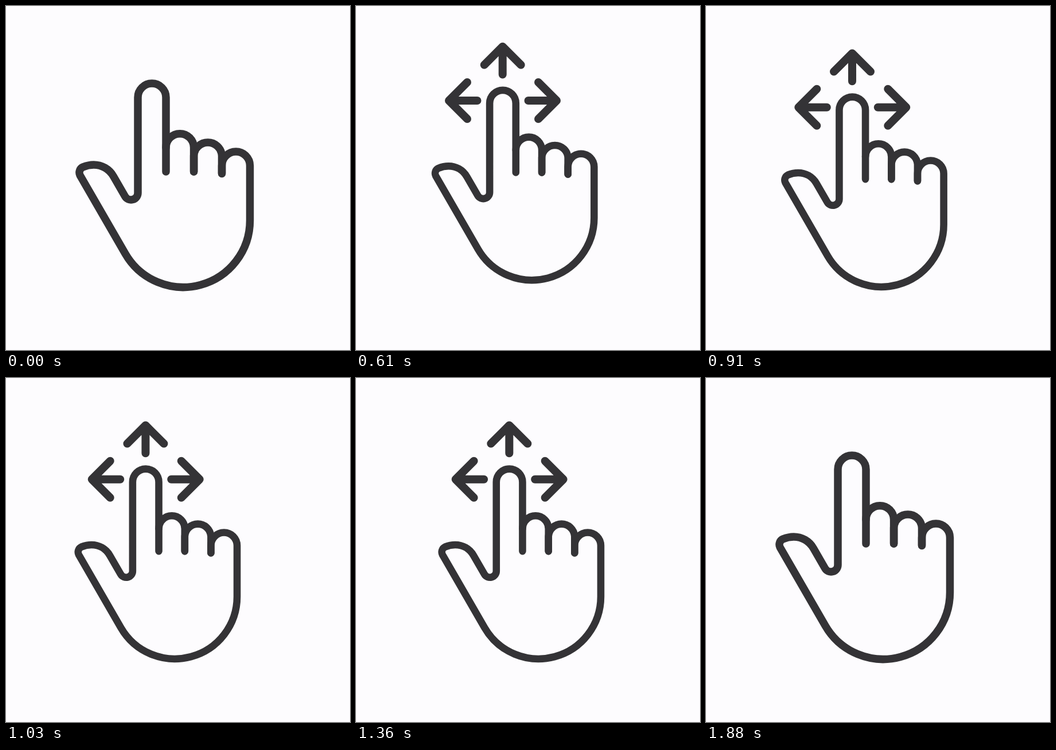
Recreate the animation shown at these times as an HTML page. Size 600 px wide and 600 px high, loop 2 s.

```html
<!DOCTYPE html>
<html lang="en">
<head>
<meta charset="utf-8">
<title>Drag gesture</title>
<style>
  html, body { margin: 0; width: 100%; height: 100%; overflow: hidden; background: #fdfcfe; }
  svg { display: block; width: 100%; height: 100%; }
  path { fill: none; stroke: #343336; stroke-width: 13.5; stroke-linecap: round; stroke-linejoin: round; }
</style>
</head>
<body>
<svg viewBox="0 0 600 600">
  <g id="scene">
    <path d="M279 289V159.5A24.5 24.5 0 0 0 230 159.5V326A12 12 0 0 1 207.6 332
             L187.4 297C180 284 167 277 153 277C147 277 140 278.5 134 281
             C128.5 283.5 126.5 290 129.1 295.4L208.1 432.2
             A116.5 116.5 0 0 0 425.5 374V278.5A24.5 24.5 0 0 0 376.5 278.5V292.5"/>
    <path d="M279 247A24.3 24.3 0 0 1 327.6 247V289"/>
    <path d="M327.6 289V261A24.5 24.5 0 0 1 376.5 261V292"/>
    <g id="arrows"></g>
  </g>
</svg>
<script>
const LOOP = 2000;
const PRESSED = 0.932;
const PIVOT = [276, 482];
const REACH = 15;
const ARM = 32;
const MOVE_START = 468, MOVE_TIME = 207;

// Tip position, pointing angle and shaft length, measured while the hand is pressed.
const arrows = [
  { tip: [255.7, 82.5], angle: 0, shaft: 48.7 },
  { tip: [350, 176.7], angle: 90, shaft: 49.5 },
  { tip: [162, 176.7], angle: -90, shaft: 49.5, slide: 13 },
];

const scene = document.getElementById('scene');
const arrowLayer = document.getElementById('arrows');
for (const arrow of arrows) {
  arrow.path = document.createElementNS('http://www.w3.org/2000/svg', 'path');
  arrow.path.style.strokeWidth = 14;
  arrowLayer.append(arrow.path);
}

const scaleAbout = ([x, y], s) => `translate(${x} ${y}) scale(${s}) translate(${-x} ${-y})`;
arrowLayer.setAttribute('transform', scaleAbout(PIVOT, 1 / PRESSED));

// Sine ease from 0 to 1 between two times.
function ease(t, from, to) {
  const p = Math.min(1, Math.max(0, (t - from) / (to - from)));
  return (1 - Math.cos(Math.PI * p)) / 2;
}

function draw(t) {
  const step = n => ease(t, MOVE_START + n * MOVE_TIME, MOVE_START + (n + 1) * MOVE_TIME);
  const dy = REACH * (step(1) - step(0));
  const dx = REACH * (2 * step(3) - step(2) - step(4));
  const press = ease(t, 200, 350) - ease(t, 1690, 1880);
  scene.setAttribute('transform',
    `translate(${dx} ${dy}) ${scaleAbout(PIVOT, 1 - (1 - PRESSED) * press)}`);

  const grow = ease(t, 240, 350);
  const shrink = ease(t, 1610, 1784);
  const arm = ARM * (ease(t, 285, 385) - ease(t, 1680, 1840));
  for (const { path, tip, angle, shaft, slide = 0 } of arrows) {
    let d = '';
    if (grow > 0 && shrink < 1) d += `M0 ${shaft * (1 - shrink)}V${shaft * (1 - grow)}`;
    if (arm > 0.01) d += `M${-arm} ${arm}L0 0L${arm} ${arm}`;
    path.setAttribute('d', d);
    path.setAttribute('transform',
      `translate(${tip[0] + slide * shrink} ${tip[1]}) rotate(${angle})`);
  }
}

function tick() {
  draw(performance.now() % LOOP);
  requestAnimationFrame(tick);
}
tick();
</script>
</body>
</html>
```
